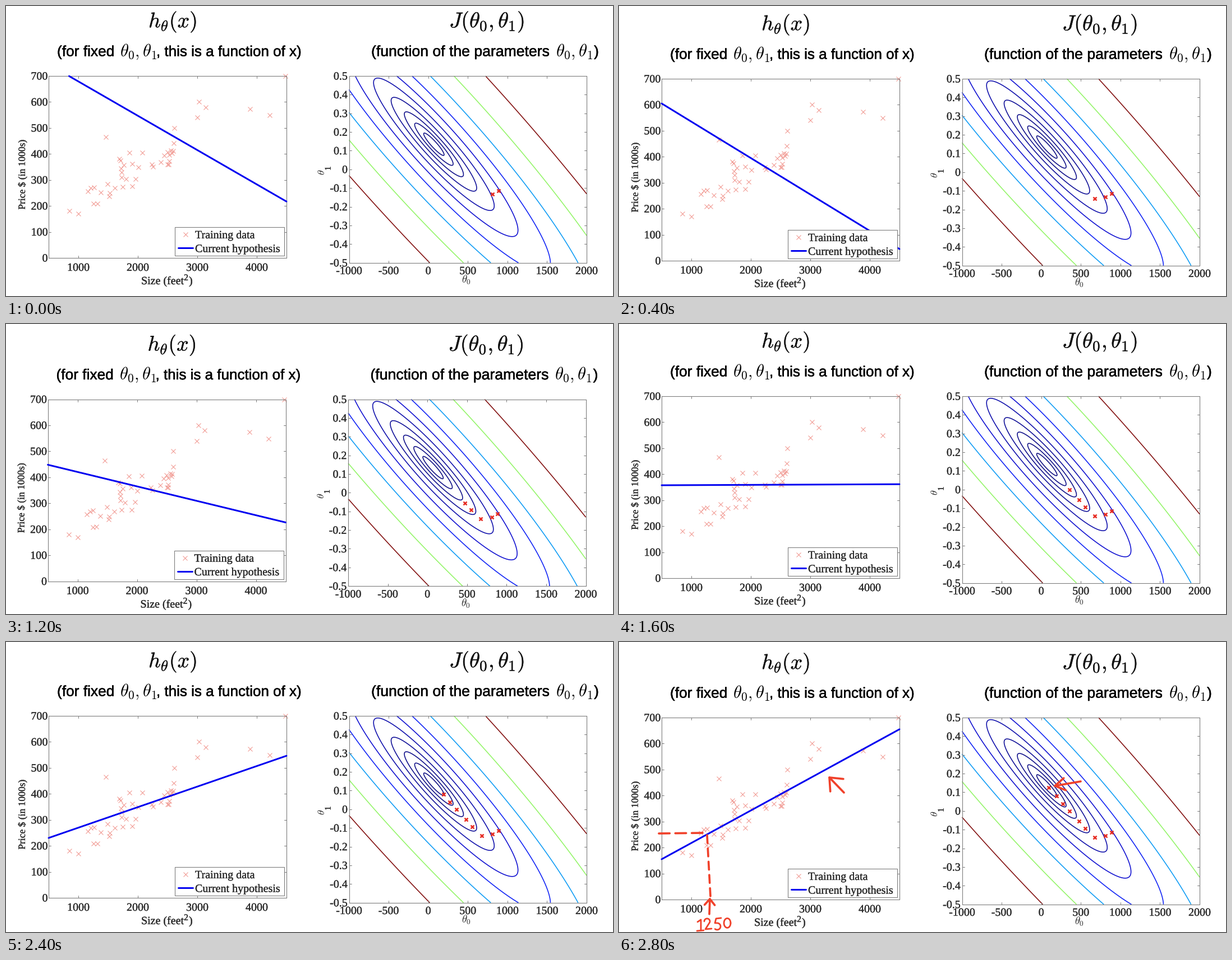
A matplotlib script for the animation above (3.2 s loop, 1082 by 518 pixels).

```python
import numpy as np
import matplotlib.pyplot as plt
from matplotlib.animation import FuncAnimation
from matplotlib.patches import Rectangle
from matplotlib.patheffects import withStroke

W, H, DPI = 1082, 518, 64
PT = 72 / DPI  # points per pixel
plt.rcParams["mathtext.fontset"] = "cm"

SERIF, SANS = "Liberation Serif", "Liberation Sans"
BLUE, PINK, RED, INK = "#0202f0", "#f0948c", "#e62a20", "#f0412a"
GREY, DARK = "#7c7c7c", "#2b2b2b"

# Statistics of the housing data: price is about BASE + SLOPE * size
MEAN_SIZE, SD_SIZE, BASE, SLOPE, MIN_COST = 2000.7, 786, 71.3, 0.1345, 2043

# Parameters visited by the descent; the first one is only a start mark
THETA = np.array([(885, -.114), (811, -.132), (675, -.14), (553, -.092),
                  (476, -.0555), (357, .001), (270, .04), (191, .079),
                  (92.6, .125)])
# The camera drifts a little on each step
DRIFT = [(0, 0), (0, 5), (-6, 1), (-1.5, 9.5), (0, 4), (0, 6), (0, 7), (0, 10)]
STEPS = len(DRIFT)

fig = plt.figure(figsize=(W / DPI, H / DPI), dpi=DPI, facecolor="white")
ax = fig.add_axes([0, 0, 1, 1])
ax.axis("off")


class Panel:
    """A boxed plot that maps data units to stage pixels."""

    def __init__(self, box, xr, yr):
        self.box, self.xr, self.yr = box, xr, yr

    def px(self, x):
        x0, _, x1, _ = self.box
        return x0 + (np.asarray(x) - self.xr[0]) / (self.xr[1] - self.xr[0]) * (x1 - x0)

    def py(self, y):
        _, y0, _, y1 = self.box
        return y1 - (np.asarray(y) - self.yr[0]) / (self.yr[1] - self.yr[0]) * (y1 - y0)

    def frame(self, xticks, yticks, label_x, label_y):
        x0, y0, x1, y1 = self.box
        stroke([(x0, y0), (x1, y0), (x1, y1), (x0, y1), (x0, y0)], GREY, 1.1, 4)
        for v in xticks:
            x = self.px(v)
            stroke([(x, y1), (x, y1 - 4)], GREY, 1, 4)
            stroke([(x, y0), (x, y0 + 4)], GREY, 1, 4)
            label(x, label_y, f"{v:g}", 20, ha="center")
        for v in yticks:
            y = self.py(v)
            stroke([(x0, y), (x0 + 4, y)], GREY, 1, 4)
            stroke([(x1, y), (x1 - 4, y)], GREY, 1, 4)
            label(label_x, y + 6.5, f"{v:g}", 20, ha="right")


def stroke(points, color, width, z=2):
    x, y = zip(*points)
    return ax.plot(x, y, color=color, lw=width * PT, zorder=z,
                   solid_capstyle="round", solid_joinstyle="round")[0]


def label(x, y, s, px, font=SERIF, color=DARK, weight=0.3, **kw):
    kw = {"ha": "left", "va": "baseline", **kw}
    t = ax.text(x, y, s, fontsize=px * PT, family=font, color=color, zorder=9, **kw)
    if "$\\" not in s:
        t.set_path_effects([withStroke(linewidth=weight * PT, foreground=color)])
    return t


def crosses(x, y, size, width, color, z):
    return ax.plot(x, y, "x", ms=size * PT, mew=width * PT, color=color, zorder=z)[0]


def headings():
    label(254, 38, r"$h_\theta(x)$", 38, color="#111111")
    label(790, 38, r"$J(\theta_0, \theta_1)$", 38.3, color="#111111")
    text = dict(font=SANS, color="black", weight=0.5)
    label(91, 89.5, "(for fixed", 26.3, **text)
    label(203, 89.5, r"$\theta_0, \theta_1$", 30.5, **text)
    label(268, 89.5, ", this is a function of x)", 26, **text)
    label(651, 89.5, "(function of the parameters", 26.6, **text)
    label(980, 89.5, r"$\theta_0, \theta_1$", 30.5, **text)
    label(1048, 89.5, ")", 26.4, **text)


def houses():
    """A dense cluster along the trend plus a few houses that stand apart."""
    rng = np.random.default_rng(4)
    size = 1100 + 1540 * rng.random(37) ** 1.3
    price = BASE + SLOPE * size + rng.normal(0, 40, 37)
    apart = np.array([(4478, 700), (4215, 549), (3890, 574), (3137, 580),
                      (3031, 600), (3000, 540), (2609, 500), (1458, 465),
                      (852, 180), (1000, 170)])
    return np.append(size, apart[:, 0]), np.append(price, apart[:, 1])


def data_panel():
    p = Panel((76, 125, 500, 450), (500, 4500), (0, 700))
    p.frame(range(1000, 4001, 1000), range(0, 701, 100), 74.5, 473)
    size, price = houses()
    crosses(p.px(size), p.py(price), 7.5, 1, PINK, 2)
    label(241, 497, "Size (feet", 20)
    label(317, 490, "2", 16)
    label(326, 497, ")", 20)
    label(38, 301, "Price $ (in 1000s)", 17.5, rotation=90, ha="right", va="center")
    ax.add_patch(Rectangle((301, 395), 195, 51, fc="white", ec=GREY,
                           lw=1.1 * PT, zorder=6))
    crosses([320], [408], 7.5, 1, PINK, 7)
    stroke([(307, 432), (333, 432)], BLUE, 3, 7)
    label(337, 415, "Training data", 20)
    label(337, 439.5, "Current hypothesis", 20)
    return p


def cost_panel():
    p = Panel((611.5, 125, 1035, 458.7), (-1000, 2000), (-0.5, 0.5))
    t0, t1 = np.meshgrid(np.linspace(*p.xr, 420), np.linspace(*p.yr, 340))
    bias = t0 - BASE + (t1 - SLOPE) * MEAN_SIZE
    cost = MIN_COST + (bias ** 2 + (SD_SIZE * (t1 - SLOPE)) ** 2) / 2
    levels = np.logspace(3.5, 6, 10)
    colors = plt.cm.jet(levels / levels[-1])
    colors[:, :3] = 0.06 + 0.9 * colors[:, :3]
    ax.contour(p.px(t0), p.py(t1), cost, levels=levels, colors=colors,
               linewidths=1.6 * PT, zorder=2)
    p.frame(range(-1000, 2001, 500), np.arange(-5, 6) / 10, 609, 479)
    label(821, 495, r"$\theta_0$", 19, ha="center")
    label(564, 297, r"$\theta$", 18, ha="center", va="center", rotation=90)
    label(575, 290, "1", 15, ha="center", va="center", rotation=90)
    return p


def dashes(a, b, n, fill=0.6):
    """Split the line from a to b into n dashes."""
    a, b = np.array(a), np.array(b)
    span = 1 / (n - 1 + fill)
    return [[a + (b - a) * i * span, a + (b - a) * (i + fill) * span]
            for i in range(n)]


def arrow(tail, tip, barb=25, spread=0.7):
    """A shaft and a two-sided head."""
    (x0, y0), (x, y) = tail, tip
    back = np.arctan2(y0 - y, x0 - x)
    ends = [(x + barb * np.cos(back + s), y + barb * np.sin(back + s))
            for s in (-spread, spread)]
    return [[tail, tip], [ends[0], tip, ends[1]]]


def arc(cx, cy, rx, ry, start, end):
    a = np.radians(np.linspace(start, end, 20))
    return list(zip(cx + rx * np.cos(a), cy + ry * np.sin(a)))


def handwriting():
    """Red pen notes that appear on the last step."""
    pen = (dashes((71, 342), (149, 341), 3, 0.66)
           + dashes((157, 345), (163, 454), 5)
           + arrow((161, 486), (162, 459), 14)
           + arrow((401, 269), (375, 242))
           + arrow((823, 249), (777, 257), 21, 0.55))
    digits = [
        [(140, 500), (146, 496), (146, 515)], [(139, 516), (151, 515)],
        arc(157, 499, 5, 5, 180, 380) + [(154, 513), (165, 512)],
        [(182, 493), (173, 494), (171, 502)] + arc(175, 508, 6, 6, -90, 130),
        arc(193, 502, 6, 8.5, 0, 360),
    ]
    dx, dy = DRIFT[-1]
    return [stroke(np.array(pts) - (dx, dy), INK, width, 8)
            for group, width in ((pen, 3.7), (digits, 2.8)) for pts in group]


headings()
left, right = data_panel(), cost_panel()
notes = handwriting()
fit = stroke([(0, 0), (1, 1)], BLUE, 3, 5)
marks = crosses([], [], 6.8, 2.5, RED, 6)
sizes = np.linspace(500, 4500, 1200)


def update(i):
    dx, dy = DRIFT[i]
    ax.set_xlim(-dx, W - dx)
    ax.set_ylim(H - dy, -dy)
    seen = THETA[:i + 2]
    prices = seen[-1, 0] + seen[-1, 1] * sizes
    shown = prices <= 700
    fit.set_data(left.px(sizes[shown]), left.py(prices[shown]))
    marks.set_data(right.px(seen[:, 0]), right.py(seen[:, 1]))
    for n in notes:
        n.set_visible(i == STEPS - 1)
    return [fit, marks, *notes]


update(0)
anim = FuncAnimation(fig, update, frames=STEPS, interval=400,
                     repeat=True, repeat_delay=0, blit=False)
plt.show()
```
